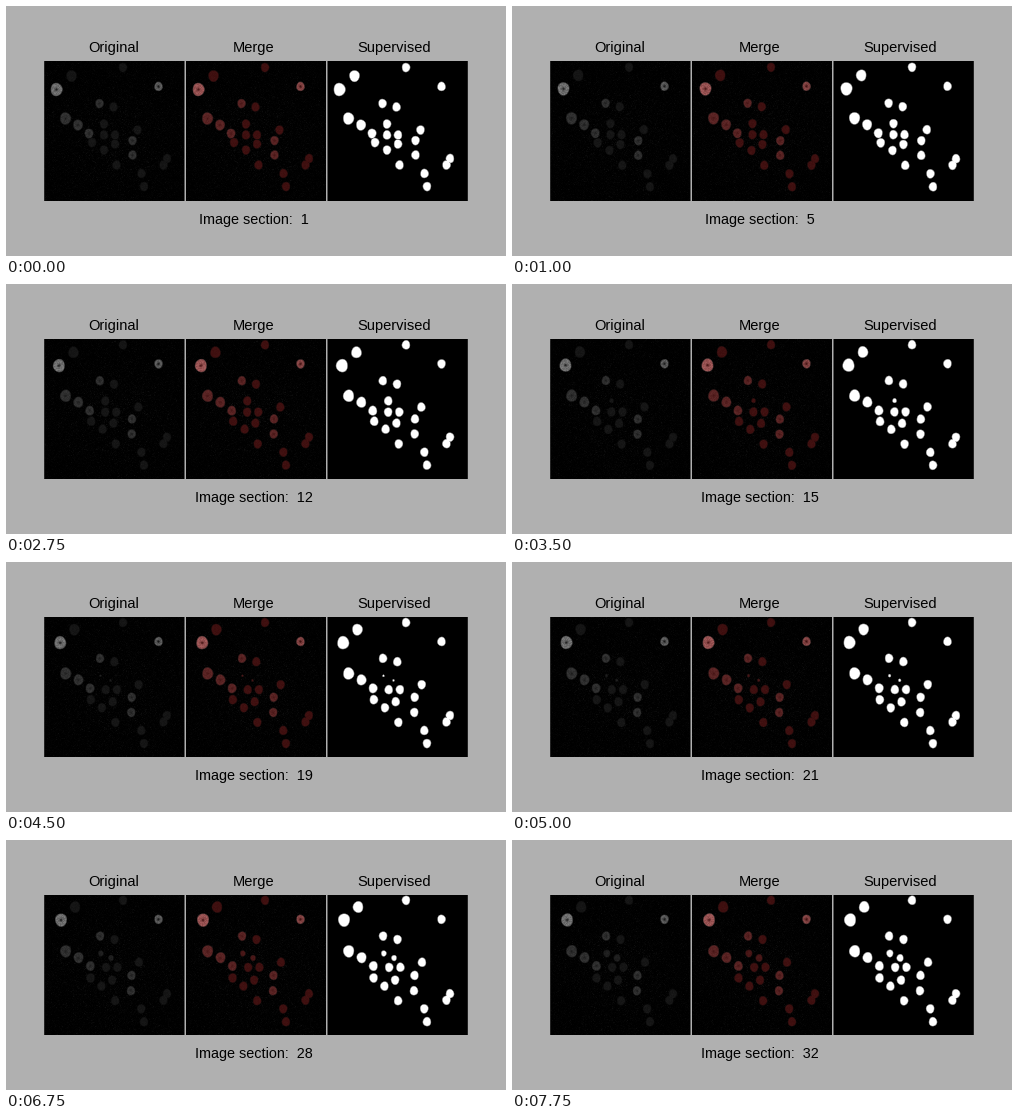
Animation of 500 by 250 pixels, one loop 8000 ms. Source, as a matplotlib script:

```python
import numpy as np
import matplotlib.pyplot as plt
from matplotlib.animation import FuncAnimation

W, H, DPI = 500, 250, 100
SECTIONS, STEP = 32, 250
GREY = 176
TOP, BOTTOM, LEFT = 55, 195, 321
PANELS = ((38.2, 178.5), (180, 320), (321.5, 461.8))

yy, xx = np.mgrid[TOP:BOTTOM, LEFT:LEFT + 141].astype(float)


def steady(section):
    return 1


def fading(section):
    return np.clip((18 - section) / 6, 0, 1)


def emerging(section):
    return np.clip((section - 14) / 22, 0, 1)


# brightness, depth of the dark core, size over time, starting points
GROUPS = [
    (112, .7, steady, [(333, 83)]),
    (92, .7, steady, [(435, 80)]),
    (48, .35, steady, [(376, 97), (342, 112), (354.5, 118.5), (365.5, 127),
                       (409, 134), (409, 148.5)]),
    (21, 0, steady, [(348, 69.5), (399.5, 61), (390, 100.5), (380.5, 128.5),
                     (391.5, 128.5), (414, 123.5), (368.5, 136), (380.5, 143.5),
                     (391.5, 137.5), (393, 158.5), (418, 167), (420.5, 180),
                     (443.5, 152), (440, 158.5)]),
    (21, 0, fading, [(380.5, 117.5)]),
    (30, 0, emerging, [(375.5, 114.8), (384.8, 119.7)]),
]


def bump(x, y, cx, cy, width):
    return np.exp(-((x - cx) ** 2 + (y - cy) ** 2) / (2 * width ** 2))


def drift(x, y, section):
    """The tissue parts at mid height; the upper left corner slides outwards."""
    ease = np.sin(np.pi / 2 * (section - 1) / (SECTIONS - 1))
    side = np.tanh((y - 132) / 4)
    centre = bump(x, y, 390, 132, 20)
    corner = bump(x, y, 338, 76, 12)
    dx = 6 * corner - 3.5 * side * centre
    dy = side * (1.2 + 1.3 * centre) - 3 * corner
    return x + ease * dx, y + ease * dy


def nucleus(x, y, size, section):
    """Coverage and dark core of one nucleus in the mask panel."""
    radius = size * (4.25 + .05 * max(0, 370 - x))    # larger to the left
    if radius < .5:
        return 0 * xx, 0 * xx
    phase = x + y
    cx, cy = drift(x, y, section)
    dx, dy = xx - cx, yy - cy
    angle = np.arctan2(dy, dx)
    edge = radius * (1 - .06 * np.cos(2 * angle)
                     + .03 * np.sin(3 * angle + phase + .3 * section))
    cover = np.clip(.5 + (edge - np.hypot(dx, dy)) / 1.4, 0, 1)
    return cover, bump(xx, yy, cx, cy, 1.05)


def speckle(rng):
    """Faint sensor noise, a little denser towards the centre."""
    level = 1.3 + 1.5 * bump(xx, yy, 391, 130, 45)
    return np.minimum(rng.exponential(1, xx.shape) * level, 15)


def render(section):
    rng = np.random.default_rng(section)
    mask, light = np.zeros_like(xx), np.zeros_like(xx)
    for glow, depth, growth, points in GROUPS:
        for x, y in points:
            cover, core = nucleus(x, y, growth(section), section)
            mask = np.maximum(mask, cover)
            light = np.maximum(light, cover * glow * (1 - depth * core))
    raw = light * rng.uniform(.85, 1.1, xx.shape) + speckle(rng) * (1 - .6 * mask)
    pale = raw * (1 - .25 * mask)
    views = (np.dstack([raw] * 3), np.dstack([raw + 42 * mask, pale, pale]),
             np.dstack([255 * mask] * 3))
    stage = np.full((H, W, 3), GREY, float)
    for (left, right), view in zip(PANELS, views):
        cols = int(left) + np.arange(141)
        inside = np.minimum(cols + 1, right) - np.maximum(cols, left)
        inside = np.clip(inside, 0, 1)[:, None]
        area = stage[TOP:BOTTOM, cols]
        stage[TOP:BOTTOM, cols] = area + (view - area) * inside
    return np.clip(stage, 0, 255).astype(np.uint8)


fig = plt.figure(figsize=(W / DPI, H / DPI), dpi=DPI)
ax = fig.add_axes([0, 0, 1, 1])
ax.axis("off")
picture = ax.imshow(render(1), extent=(0, W, H, 0), interpolation="nearest",
                    aspect="auto")
ax.set(xlim=(0, W), ylim=(H, 0))


def label(x, baseline, text, pixels):
    return ax.text(x, baseline, text, ha="center", va="baseline", color="black",
                   family="Liberation Sans", size=pixels * 72 / DPI)


for i, title in enumerate(("Original", "Merge", "Supervised")):
    label(107.8 + 140.2 * i, 46, title, 14.6)
counter = label(248, 218, "", 14.4)


def update(frame):
    section = frame + 1
    picture.set_data(render(section))
    counter.set_text(f"Image section:  {section}")
    return picture, counter


anim = FuncAnimation(fig, update, frames=SECTIONS, interval=STEP, repeat=True,
                     repeat_delay=0)
plt.show()
```
